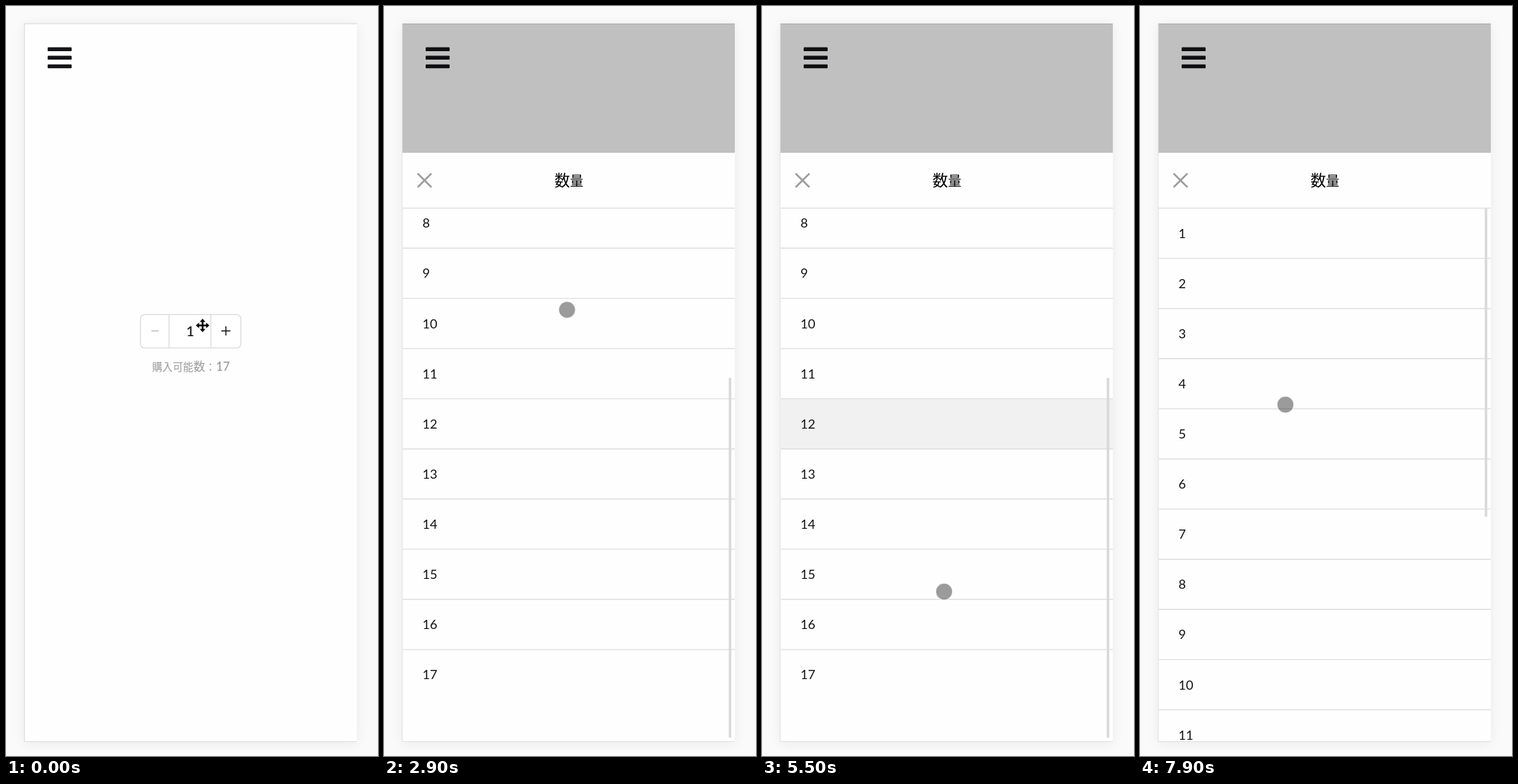
An HTML page for the animation above (8 s loop, 527 px wide and 1063 px high).

```html
<!DOCTYPE html>
<html lang="ja">
<head>
<meta charset="utf-8">
<title>Quantity picker</title>
<style>
  html, body { margin: 0; width: 100%; height: 100%; overflow: hidden; background: #fafafa; }
  svg { display: block; width: 100%; height: 100%; }
  text { font-family: Lato, "Noto Sans CJK JP", "Noto Sans CJK", sans-serif; fill: #111; }
  .mid { text-anchor: middle; }
  .line { stroke: #dedede; stroke-width: 1.4; }
</style>
</head>
<body>
<svg viewBox="0 0 527 1063" preserveAspectRatio="none">
  <defs>
    <filter id="soft" x="-10%" y="-10%" width="120%" height="120%"><feGaussianBlur stdDeviation="9"/></filter>
    <filter id="glow" x="-20%" y="-20%" width="140%" height="140%"><feGaussianBlur stdDeviation="1.2"/></filter>
    <clipPath id="panelClip"><rect x="26.5" y="25" width="470.5" height="1017.5"/></clipPath>
    <clipPath id="sheetClip"><rect id="sheetBox" x="26" width="472"/></clipPath>
  </defs>
  <rect width="527" height="1063" fill="#fafafa"/>
  <rect x="26" y="27" width="471" height="1018" fill="#000" opacity=".065" filter="url(#soft)"/>
  <rect x="26" y="25" width="471" height="1017.5" fill="#fefefe"/>
  <path d="M497 25.2H26.2V1042.5H497" fill="none" stroke="#dcdcdc" stroke-width="1.2"/>
  <g clip-path="url(#panelClip)">
    <g id="page">
      <g fill="#151418">
        <rect x="59" y="58.5" width="34" height="5.6" rx="1.2"/>
        <rect x="59" y="70.5" width="34" height="5.6" rx="1.2"/>
        <rect x="59" y="82.7" width="34" height="5.6" rx="1.2"/>
      </g>
      <rect x="190.5" y="437.3" width="142.3" height="47.4" rx="6" fill="#fff" stroke="#d9d9d9" stroke-width="1.3"/>
      <path d="M231 437.5V484.5M290.2 437.5V484.5" stroke="#d9d9d9" stroke-width="1.3"/>
      <path id="minus" d="M206 460.5H216.3" stroke-width="1.5"/>
      <path d="M305 460.5H318M311.5 454V467" stroke="#111" stroke-width="1.5"/>
      <text id="value" class="mid" x="261" y="468" font-size="20" font-weight="500"></text>
      <text x="207" y="516.5" font-size="14.6" font-weight="500" style="fill:#999">購入可能<tspan font-size="16.6">数</tspan><tspan font-size="15">：</tspan><tspan x="297.5" font-size="17">17</tspan></text>
      <g id="press">
        <rect x="230.5" y="437.5" width="60.5" height="47.5" fill="none" stroke="#86caf2" stroke-width="3" filter="url(#glow)"/>
        <rect x="230" y="437" width="61.3" height="48.2" fill="#97d7f2" opacity=".7"/>
      </g>
      <rect id="shade" x="26" y="25" width="472" height="183.3"/>
      <g clip-path="url(#sheetClip)">
        <g id="sheet">
          <rect x="26" width="472" height="900" fill="#fefefe"/>
          <g id="list"></g>
          <rect id="thumb" x="488.4" width="3.6" rx="1.5" fill="#d9d9d9"/>
          <rect x="26" width="472" height="78" fill="#fefefe"/>
          <path class="line" d="M26 78.2H498"/>
          <path d="M47.6 29L67.2 48.6M67.2 29L47.6 48.6" stroke="#9b9b9b" stroke-width="2.6"/>
          <text x="241.5" y="46.8" font-size="22" font-weight="500" style="fill:#000">数<tspan font-size="19">量</tspan></text>
        </g>
      </g>
    </g>
  </g>
  <circle id="dot" r="11.8" fill="#000" fill-opacity=".39" stroke="#fff" stroke-opacity=".7" stroke-width="1.2"/>
  <path id="cursor" transform="translate(278.5 452.8)" stroke="#fff" stroke-width="1.2" paint-order="stroke"
    d="M0 -9.5L4 -5H1.2V-1.2H5V-4L9.5 0L5 4V1.2H1.2V5H4L0 9.5L-4 5H-1.2V1.2H-5V4L-9.5 0L-5 -4V-1.2H-1.2V-5H-4Z"/>
</svg>
<script>
const LOOP = 8000, STEP = 100;
const ROW = 71.1, FULL = 834, CONTENT = 1346, BOTTOM = 1042.3;
const END = CONTENT - FULL;
const $ = id => document.getElementById(id);
const set = (id, attrs) => { for (const k in attrs) $(id).setAttribute(k, attrs[k]); };
const ramp = (t, a, b) => Math.min(1, Math.max(0, (t - a) / (b - a)));
const out = (p, k) => 1 - Math.pow(1 - p, k);
const smooth = p => p * p * (3 - 2 * p);

// Visits of the sheet: tap time, choice time
const visits = [[400, 1200], [1700, 3500], [3900, 1e5]];

// Keys: time, then values
const dotPath = [
  [100, 271, 464], [200, 269, 465], [800, 269, 465], [1100, 238, 659], [1200, 238, 659],
  [1500, 272, 464], [2500, 272, 464], [2750, 266, 309], [3100, 249, 618], [3600, 249, 618],
  [3900, 272, 464], [4800, 272, 464], [5200, 262, 800], [5500, 258, 830], [5700, 256, 835],
  [6300, 198, 944], [6500, 196, 965], [6800, 196, 960], [7300, 204, 340], [7400, 204, 345], [7900, 206, 565]
];
const pullPath = [[6200, 0], [6300, 6], [6500, 18], [6600, 14], [6900, 0]];
const scrollPath = [[1100, 0], [1200, 5 * ROW], [2450, 5 * ROW], [2750, END], [7400, END], [7850, 0]];

function track(keys, t) {
  if (t <= keys[0][0]) return keys[0].slice(1);
  for (let i = 1; i < keys.length; i++) {
    const a = keys[i - 1], b = keys[i];
    if (t <= b[0]) {
      const p = smooth(ramp(t, a[0], b[0]));
      return a.slice(1).map((v, j) => v + (b[j + 1] - v) * p);
    }
  }
  return keys[keys.length - 1].slice(1);
}

let rows = '<rect id="chosen" x="26" width="472" height="' + ROW + '" fill="#f1f1f1"/>';
for (let n = 1; n <= 17; n++) {
  const y = 78.2 + n * ROW;
  rows += `<text x="54.4" y="${y - 28.9}" font-size="18.2">${n}</text>`;
  if (n < 17) rows += `<path class="line" d="M26 ${y}H498"/>`;
}
$('list').innerHTML = rows;

function draw(t) {
  const value = t < 1200 ? 1 : t < 3500 ? 6 : 12;
  let open = 0, shade = 0, press = 0, fade = 1;
  for (const [tap, pick] of visits) {
    if (t < tap || t >= pick + 300) continue;
    fade = 1 - out(ramp(t, pick, pick + 300), 3);
    open = out(ramp(t, tap + 200, tap + 500), 1.65) * fade;
    shade = ramp(t, tap + 100, tap + 300) * fade;
    press = 1 - ramp(t, tap + 300, tap + 500);
  }
  const height = FULL * open, top = BOTTOM - height;
  const [scroll] = track(scrollPath, t);
  const [pull] = track(pullPath, t);
  const [x, y] = track(dotPath, t);

  set('page', { transform: `translate(0 ${pull})` });
  set('minus', { stroke: value > 1 ? '#111' : '#bbb' });
  $('value').textContent = value;
  set('press', { opacity: press });
  set('shade', { opacity: .243 * shade });

  set('sheetBox', { y: top, height: height });
  set('sheet', { transform: `translate(0 ${top})` });
  set('list', { transform: `translate(0 ${-scroll})` });
  set('chosen', { y: 78.2 + (value - 1) * ROW });
  const rail = Math.max(0, height - 10), size = rail * height / CONTENT;
  set('thumb', {
    y: 5 + scroll * (rail - size) / (CONTENT - height),
    height: size,
    opacity: fade
  });

  set('dot', { cx: x, cy: y, visibility: t < 100 ? 'hidden' : 'visible' });
  set('cursor', { visibility: t < 100 ? 'visible' : 'hidden' });
}

const start = performance.now();
function tick() {
  const t = (performance.now() - start) % LOOP;
  draw(Math.floor(t / STEP) * STEP);
  requestAnimationFrame(tick);
}
tick();
</script>
</body>
</html>
```
